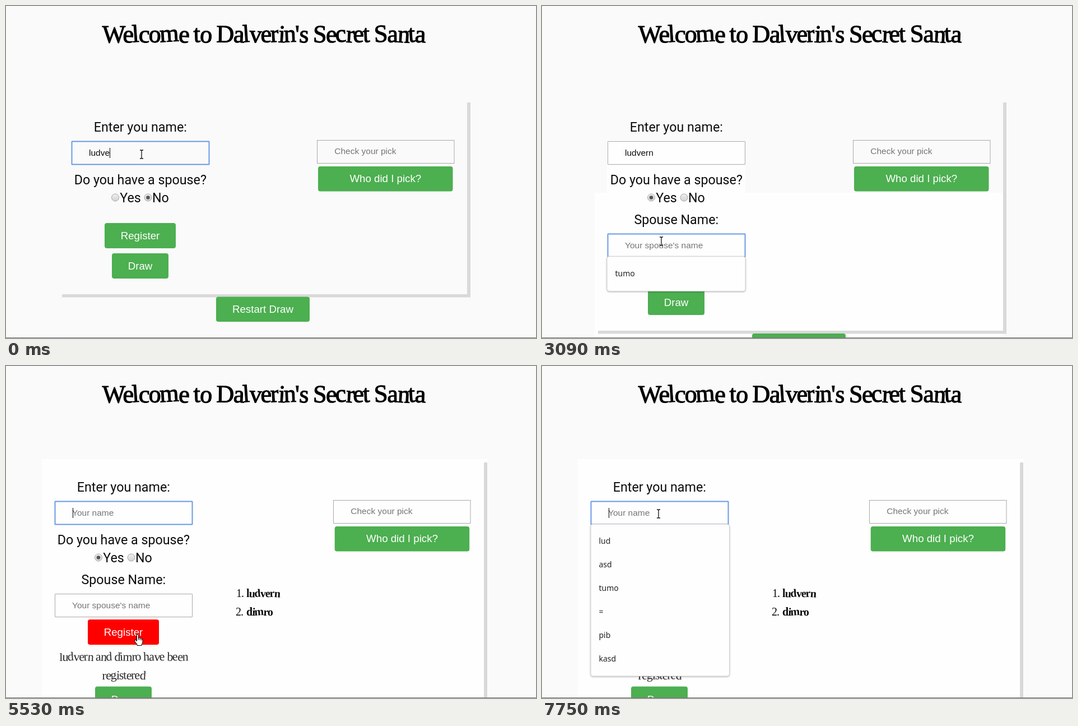
An HTML page for the animation above (8000 ms loop, 946x592 px).

```html
<!DOCTYPE html>
<html lang="en">
<head>
<meta charset="utf-8">
<title>Secret Santa draw</title>
<style>
  html, body { margin: 0; width: 100%; height: 100%; overflow: hidden; background: #fafafa; }
  svg { display: block; }
  text { fill: #0c0c0c; }
  .label { font: 23.25px Roboto, sans-serif; }
  .mid { text-anchor: middle; }
  .field { font: 15.5px "Liberation Sans", Arial, sans-serif; }
  .hint { fill: #757575; }
  .btn rect { fill: #4caf50; }
  .btn text { font: 18.7px "Liberation Sans", Arial, sans-serif; fill: #fff; text-anchor: middle; }
  .fancy { font-family: "Liberation Serif", serif; letter-spacing: -1px; }
  .title { font-size: 44px; letter-spacing: -1.6px; fill: #000; stroke: #000; stroke-width: 1.1; }
  .list { font-size: 20px; }
  .list .who { font-weight: bold; }
  .note { font-size: 22px; }
  .note text { fill: #2a2a2a; }
  .menu rect { fill: #fefefe; stroke: #d0d0d0; filter: drop-shadow(0 1px 1.5px #0004); }
  .menu text { font: 14px "Noto Sans", sans-serif; fill: #222; }
  .box { fill: none; stroke: #a9a9a9; }
  .box.focus { stroke: #699ae6; stroke-width: 2; }
  .patch { fill: #fefefe; }
  .edge { fill: #d9d9d9; }
  .cursor { fill: #fff; stroke: #000; stroke-linejoin: round; }
</style>
</head>
<body>
<svg width="946" height="592" viewBox="0 0 946 592">
  <defs>
    <linearGradient id="knob" x2="0" y2="1">
      <stop stop-color="#f0f0f0"/><stop offset="1" stop-color="#d2d2d2"/>
    </linearGradient>
  </defs>
  <rect width="946" height="592" fill="#fafafa"/>

  <rect class="patch" data-on="800-5530" x="116" y="240" width="247" height="110"/>
  <rect class="patch" data-on="1870-5530" x="94" y="333" width="729" height="258"/>
  <rect class="patch" data-on="5530-8000" x="64" y="166" width="795" height="426"/>

  <path class="edge" data-on="0-1870" d="M823 172h6v347.5H100v-5.5h723z"/>
  <path class="edge" data-on="1870-5530" d="M823 172h6v412.5H100v-5.5h723z"/>
  <rect class="edge" data-on="5530-8000" x="853" y="172" width="6" height="420"/>

  <text class="fancy title mid" x="459.5" y="64.5">Welcome to Dalverin's Secret Santa</text>

  <g id="left">
    <text class="label mid" x="239.8" y="224">Enter you name:</text>
    <rect id="nameBox" x="117.5" y="241.5" width="245" height="41" rx="0.5"/>
    <text id="name" class="field" x="148" y="267"></text>
    <text class="label mid" x="239.8" y="317.5">Do you have a spouse?</text>
    <g fill="url(#knob)" stroke="#a6a6a6">
      <rect data-on="800-1870" x="246.5" y="334.5" width="15" height="15" fill="#dce8fb" stroke="#5b93e8" stroke-width="1.5"/>
      <circle cx="195" cy="341.5" r="6.5"/>
      <circle cx="253.5" cy="341.5" r="6.5"/>
    </g>
    <circle id="dot" cy="341.5" r="3.3" fill="#555"/>
    <text class="label" x="203.2" y="350">Yes</text>
    <text class="label" x="261" y="350">No</text>
    <g data-on="1870-8000">
      <text class="label mid" x="239.8" y="389">Spouse Name:</text>
      <rect id="spouseBox" x="117.5" y="406.5" width="245" height="41" rx="0.5"/>
      <text id="spouse" class="field" x="148" y="432"></text>
      <path id="wave" data-on="3910-5530" fill="none" stroke="#e03030" stroke-width="1.1"/>
    </g>
    <g id="register" class="btn">
      <rect x="176" y="387" width="127" height="45" rx="4"/>
      <text x="239.5" y="416">Register</text>
    </g>
    <g class="fancy note mid" data-on="5530-8000">
      <text x="240" y="525.5">ludvern and dimro have been</text>
      <text x="240" y="558.5">registered</text>
    </g>
    <g id="draw" class="btn">
      <rect x="189" y="441" width="101" height="45" rx="4"/>
      <text x="239.5" y="470">Draw</text>
    </g>
    <rect id="caret" width="1" height="18"/>
  </g>

  <g class="fancy list" data-on="5530-8000">
    <text x="411" y="412">1.</text><text class="who" x="429" y="412">ludvern</text>
    <text x="410" y="445">2.</text><text class="who" x="429" y="445">dimro</text>
  </g>

  <g id="check">
    <rect class="box" x="555.5" y="239.5" width="244.5" height="41"/>
    <text class="field hint" x="586.3" y="264.3">Check your pick</text>
  </g>
  <g id="ask" class="btn">
    <rect x="557" y="286" width="240.5" height="44.5" rx="4"/>
    <text x="677.3" y="314">Who did I pick?</text>
  </g>

  <g id="restart" class="btn" data-on="0-5530">
    <rect x="375" y="518.5" width="167" height="44.5" rx="4"/>
    <text x="458.5" y="547">Restart Draw</text>
  </g>

  <g class="menu" data-on="2690-3380">
    <rect x="116" y="446.5" width="247" height="62" rx="4"/>
    <text x="130.5" y="482">tumo</text>
  </g>
  <g class="menu" id="names" data-on="7630-8000">
    <rect x="87" y="282" width="247.5" height="271" rx="4"/>
  </g>

  <g id="pointer">
    <path id="arrow" class="cursor" d="M.5 .5V15.5L4 12.2 6.4 17.6 8.8 16.5 6.5 11.3H11.3Z"/>
    <path id="beam" fill="none" stroke="#111" stroke-width="1.3" d="M-3 -7H-1L0 -6 1 -7H3M0 -6V7M-3 8H-1L0 7 1 8H3"/>
    <path id="hand" class="cursor" d="M-1.5 1.5Q0 -.8 1.5 1.5V7Q3.5 5.8 4.2 7.6 6.2 6.6 7 8.6 9 8 9 10.5V14Q9 17 7 18.5V20.5H-1V18.5L-5.5 12.5Q-6 10 -3.8 10.6L-1.5 12.5ZM1.5 7V10.5M4.2 7.6V11M7 8.6V11.5"/>
  </g>

  <rect y="591" width="946" height="1" fill="#777"/>
</svg>
<script>
const LOOP = 8000;
const $ = id => document.getElementById(id);
const timed = [...document.querySelectorAll('[data-on]')].map(el => [el, ...el.dataset.on.split('-').map(Number)]);

const typed = {
  name: [[0, 'ludve'], [120, 'ludver'], [240, 'ludvern'], [5530, '']],
  spouse: [[0, ''], [3380, 'd'], [3510, 'di'], [3650, 'dim'], [3780, 'dimr'], [3910, 'dimro'], [5530, '']]
};
const hints = { name: 'Your name', spouse: "Your spouse's name" };
const focus = [[0, 'name'], [800, ''], [2560, 'spouse'], [5530, 'name']];
const caretOn = [[0, 1], [800, 0], [2560, 1], [3090, 0], [3380, 1], [4310, 0], [4900, 1], [6100, 0], [6650, 1], [7210, 0], [7630, 1]];
const heat = [[0, 0], [5150, .38], [5290, .75], [5400, 1], [5960, .7], [6100, .35], [6250, 0]];
const pointer = [
  [0, 'beam', 242, 264], [1200, 'beam', 240, 278], [1340, 'beam', 232, 305], [1470, 'arrow', 214, 325],
  [1610, 'arrow', 202, 335], [1740, 'arrow', 198, 337], [2010, 'arrow', 202, 354], [2140, 'beam', 207, 387],
  [2280, 'beam', 211, 405], [2420, 'beam', 213, 419], [4900, 'beam', 217, 438], [5020, 'hand', 229, 465],
  [5150, 'hand', 231, 471], [5290, 'hand', 233, 474], [5400, 'hand', 235, 478],
  [5960, 'arrow', 248, 449], [6100, 'beam', 261, 430], [6250, 'beam', 270, 419],
  [6520, 'arrow', 280, 396], [6650, 'arrow', 282, 382], [6780, 'arrow', 279, 373], [6910, 'arrow', 277, 368],
  [7070, 'arrow', 285, 345], [7210, 'arrow', 262, 302], [7340, 'beam', 226, 271], [7480, 'beam', 208, 263]
];

const at = (track, t) => track.findLast(step => step[0] <= t);
const show = (el, on) => el.style.visibility = on ? 'inherit' : 'hidden';
const move = (id, x, y) => $(id).setAttribute('transform', `translate(${x} ${y})`);

// Playful lettering: each glyph leans a little
for (const text of document.querySelectorAll('.title, .note text, .who'))
  text.setAttribute('rotate', [...text.textContent].map((_, i) => (4 * Math.sin(i * 2.3)).toFixed(1)).join(' '));

['lud', 'asd', 'tumo', '=', 'pib', 'kasd'].forEach((word, i) =>
  $('names').insertAdjacentHTML('beforeend', `<text x="101.5" y="${317 + 42 * i}">${word}</text>`));
$('wave').setAttribute('d', 'M149 435' + 'l2 -2l2 2'.repeat(9) + 'l2 -2');

function setField(id, t, active) {
  const value = at(typed[id], t)[1], text = $(id);
  text.textContent = value || hints[id];
  text.setAttribute('class', value ? 'field' : 'field hint');
  $(id + 'Box').setAttribute('class', active === id ? 'box focus' : 'box');
  if (active === id) {
    const width = value ? text.getComputedTextLength() : 1;
    $('caret').setAttribute('x', Math.round(148 + width));
    $('caret').setAttribute('y', id === 'name' ? 253 : 418);
  }
}

function render(t) {
  for (const [el, from, to] of timed) show(el, t >= from && t < to);

  const married = t >= 1870, done = t >= 5530;
  move('left', done ? -30 : 0, 0);
  move('check', done ? 29 : 0, 0);
  move('ask', done ? 29.7 : 0, 0);
  move('register', 0, married ? 65 : 0);
  move('draw', 0, done ? 130.5 : married ? 65 : 0);
  move('restart', 0, married ? 65.5 : 0);
  $('dot').setAttribute('cx', married ? 195 : 253.5);

  const active = at(focus, t)[1];
  setField('name', t, active);
  setField('spouse', t, active);
  show($('caret'), at(caretOn, t)[1]);

  const k = at(heat, t)[1];
  $('register').firstElementChild.style.fill = `rgb(${76 + 179 * k}, ${175 * (1 - k)}, ${80 * (1 - k)})`;

  const [, kind, x, y] = at(pointer, t);
  move('pointer', x, y);
  for (const id of ['arrow', 'beam', 'hand']) show($(id), id === kind);
}

const start = performance.now();
function tick() {
  render((performance.now() - start) % LOOP);
  requestAnimationFrame(tick);
}
tick();
</script>
</body>
</html>
```
